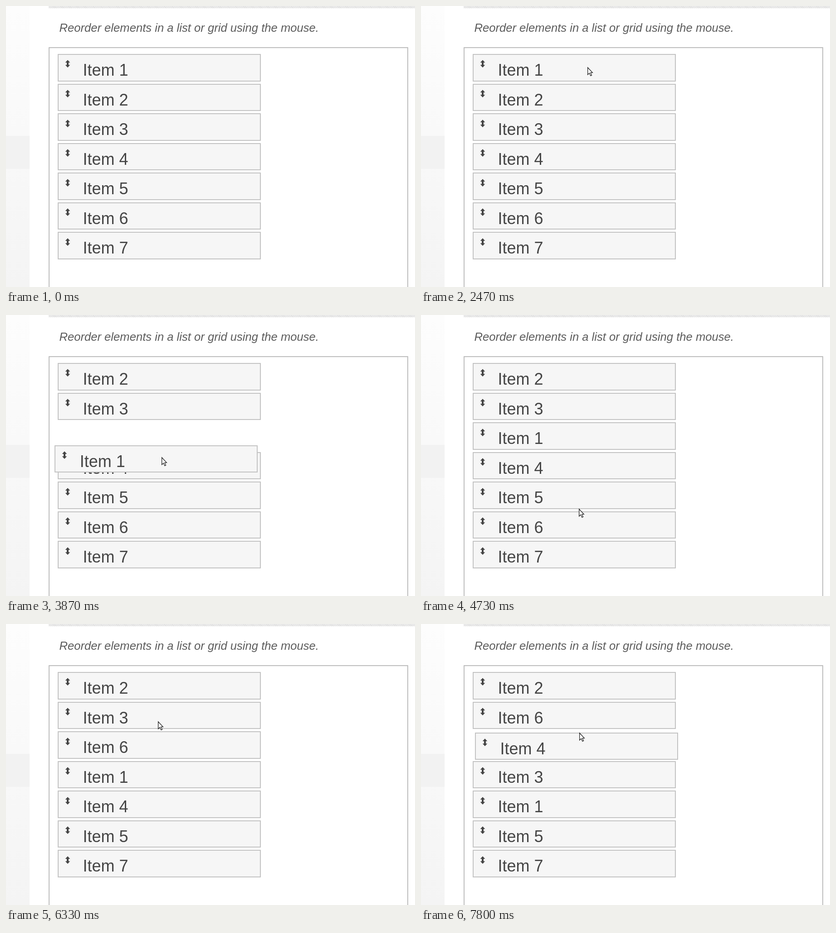
These frames come from a looping animation (902 px wide and 621 px high, 8 s). An HTML page:

```html
<!DOCTYPE html>
<html lang="en">
<head>
<meta charset="utf-8">
<title>Sortable list</title>
<style>
  html, body { margin: 0; width: 100%; height: 100%; overflow: hidden; background: #fff; }
  body { position: relative; font-family: "Liberation Sans", Arial, sans-serif; }
  body > *, .item, .item * { position: absolute; }
  .side { left: 0; top: 0; width: 52px; height: 621px; background: linear-gradient(#fdfdfd, #f9f9f9 45%, #f4f4f4); }
  .side::after { content: ""; position: absolute; top: 287px; width: 52px; height: 73px; background: #f2f2f2; }
  .strip { left: 94px; top: 0; width: 808px; height: 5px; background: repeating-linear-gradient(45deg, #dfdfdf 0 1px, #ececec 1px 3px); }
  .caption { left: 117.4px; top: 33px; font: italic 25.64px/30px "Liberation Sans", Arial, sans-serif; color: #5c5c5c; white-space: nowrap; }
  .frame { left: 94px; top: 91px; width: 789px; height: 560px; border: 2px solid #bdbdbd; }
  .list { left: 97px; top: 93px; width: 788px; height: 528px; overflow: hidden; isolation: isolate; }
  .item { box-sizing: border-box; width: 448px; height: 60.6px; border: 2px solid #c3c3c3; background: #f6f6f6; color: #454545; }
  .item span { left: 53.4px; top: 14.05px; font-size: 36px; line-height: 40px; white-space: nowrap; }
  .item svg { left: 14px; top: 11.4px; fill: #444; }
  #cursor { left: 0; top: 0; overflow: visible; }
</style>
</head>
<body>
<div class="side"></div>
<div class="strip"></div>
<div class="caption">Reorder elements in a list or grid using the mouse.</div>
<div class="frame"></div>
<div class="list" id="list"></div>
<svg id="cursor" width="12" height="21">
  <path d="M.7 1V16.7L4.4 13.3 7 19.2 9.5 18.1 7 12.4H11.3Z" fill="#fff" stroke="#222" stroke-width="1.3"/>
</svg>
<script>
// All times are in ticks of 1/15 s.
const TICKS_PER_SECOND = 15;
const LOOP = 120;
const COUNT = 7;
const LIST = { x: 97, y: 93 };
const SLOT = { x: 114, y: 106.1, pitch: 65.55, middle: 30.3 };
const ENTRY = { x: 607, y: -70 };

// Each stroke eases the pointer from where it was to x, y in a few visible steps.
const stroke = (start, end, steps, x, y, power = 1.6) => ({ start, end, steps, x, y, power });
const strokes = [
  stroke(10, 15, 6, 673, 190),
  stroke(37, 41, 3, 350, 132, 7.3),
  stroke(43, 51, 5, 337, 246),
  stroke(54, 60, 4, 344, 322),
  stroke(67, 71, 3, 349, 450),
  stroke(74, 74, 1, 353, 400),
  stroke(77, 84, 4, 315.7, 209, 2),
  stroke(86, 90, 3, 336, 225),
  stroke(93, 95, 2, 334, 210),
  stroke(98, 100, 2, 332, 301),
  stroke(107, 110, 2, 345, 387),
  stroke(113, 113, 1, 344, 363),
  stroke(117, 117, 1, 349, 240)
];

// The pointer takes hold of whatever item lies under x, y.
const drag = (start, end, x, y) => ({ start, end, x, y });
const drags = [
  drag(43, 62, 350, 132),
  drag(74, 86, 353, 443.5),
  drag(98, 103, 335, 207),
  drag(113, LOOP, 344, 368.5)
];

const list = document.getElementById("list");
const cursor = document.getElementById("cursor");
const items = Array.from({ length: COUNT }, (_, i) => {
  const item = document.createElement("div");
  item.className = "item";
  item.innerHTML = `<svg width="12" height="18"><path d="M6 .3 11.3 6H8V11.2H11.3L6 16.9 .7 11.2H4V6H.7Z"/></svg><span>Item ${i + 1}</span>`;
  list.append(item);
  return item;
});

const slotTop = slot => SLOT.y + slot * SLOT.pitch;

function pointerAt(tick) {
  let point = ENTRY;
  for (const { start, end, steps, x, y, power } of strokes) {
    if (tick < start) break;
    const stepStart = k => Math.round(start + k * (end - start) / Math.max(1, steps - 1));
    let done = 1;
    while (done < steps && stepStart(done) <= tick) done++;
    const eased = 1 - (1 - done / steps) ** power;
    point = { x: point.x + (x - point.x) * eased, y: point.y + (y - point.y) * eased };
  }
  return point;
}

// A dragged item passes a neighbour once the pointer crosses its middle.
function slotFor(home, grabY, y) {
  const position = (y - SLOT.y - SLOT.middle) / SLOT.pitch;
  return y > grabY ? Math.max(home, Math.floor(position)) : Math.min(home, Math.ceil(position));
}

function place(item, left, top, lifted) {
  item.style.left = left - LIST.x + "px";
  item.style.top = top - LIST.y + "px";
  item.style.zIndex = lifted ? 1 : 0;
}

function draw(tick) {
  const pointer = pointerAt(tick);
  cursor.style.visibility = tick < strokes[0].start ? "hidden" : "visible";
  cursor.style.transform = `translate(${Math.round(pointer.x)}px, ${Math.round(pointer.y)}px)`;

  const order = [...items];
  let held = null;
  for (const { start, end, x, y } of drags) {
    if (tick < start) break;
    const home = Math.floor((y - SLOT.y) / SLOT.pitch);
    const [item] = order.splice(home, 1);
    order.splice(slotFor(home, y, pointerAt(Math.min(tick, end - 1)).y), 0, item);
    held = tick < end ? { item, left: SLOT.x + pointer.x - x, top: slotTop(home) + pointer.y - y } : null;
  }
  order.forEach((item, slot) => place(item, SLOT.x, slotTop(slot), false));
  if (held) place(held.item, held.left, held.top, true);
}

const begin = performance.now();
function animate() {
  const seconds = (performance.now() - begin) / 1000;
  draw(Math.floor(seconds * TICKS_PER_SECOND) % LOOP);
  requestAnimationFrame(animate);
}
animate();
</script>
</body>
</html>
```
